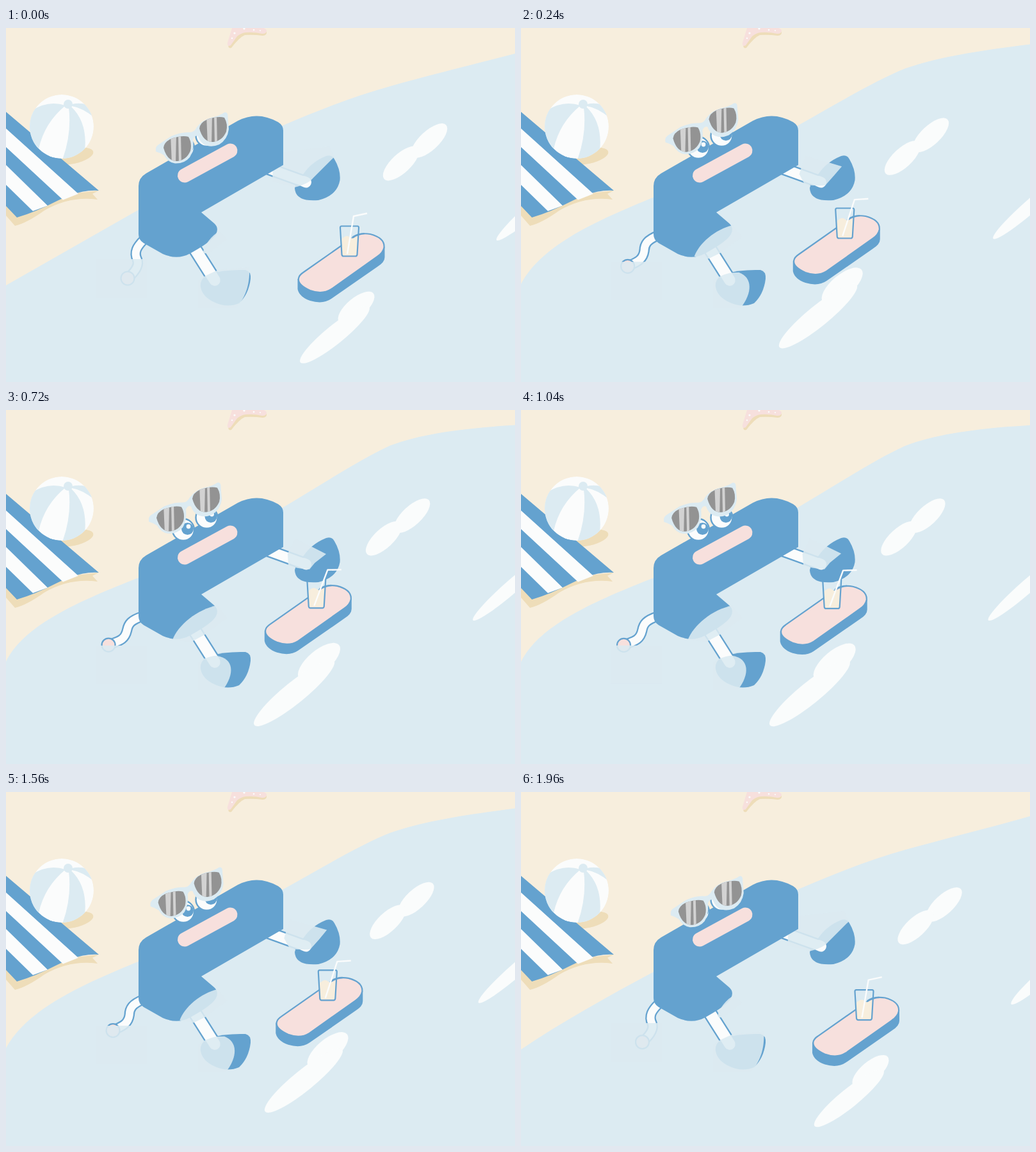
Animation, 795 px wide and 553 px high, one loop 2000 ms. Source, as an HTML page:

```html
<!DOCTYPE html>
<html lang="en">
<head>
<meta charset="utf-8">
<title>Beach day</title>
<style>
  html, body { margin: 0; width: 100%; height: 100%; overflow: hidden; background: #f7eedd; }
  svg { display: block; width: 795px; height: 553px; --p: 0; --q: 0; }
  .blue { fill: #64a2cf; }
  .pale { fill: #dcebf2; }
  .white { fill: #fbfcfc; }
  .pink { fill: #f7e0dd; }
  .shade { fill: #eeddb9; }
  .line { fill: none; stroke: #64a2cf; stroke-width: 2.2; stroke-linejoin: round; }
  .veil { fill: #dcebf2; fill-opacity: .88; }
  .limb { fill: none; stroke-linecap: round; stroke-linejoin: round; }
  .rim { stroke: #64a2cf; }
  .skin { stroke: #fbfcfc; }
  .float { transform: translate(calc(var(--p) * -52px), calc(var(--p) * -47.4px)); }
  .straw { transform-origin: 533px 353px; transform: rotate(calc(var(--q) * 11deg)); }
  .foam1 { transform: translate(calc(var(--q) * -27px), calc(var(--q) * -11px)); }
  .foam2 {
    transform-origin: 517px 468px;
    transform: translate(calc(var(--q) * -63px), calc(var(--q) * -39px)) scale(calc(1 + var(--q) * .16));
  }
  .foam3 { transform: translate(calc(var(--q) * -37px), calc(var(--q) * -3px)); }
  .shades { transform: translate(calc(var(--q) * -11px), calc(var(--q) * -18.5px)); }
  #hand { transform: translate(calc(var(--q) * -30px), calc(var(--q) * -24px)); }
</style>
</head>
<body>
<svg id="scene" viewBox="0 0 795 553">
  <defs>
    <clipPath id="lensClip">
      <path id="lensShape" d="M246 187Q247 178 258 173Q275 167 285 170Q291 180 288 192Q282 206 268 208Q252 209 246 187Z"/>
    </clipPath>
    <clipPath id="ballClip"><circle cx="87" cy="154" r="50"/></clipPath>
    <g id="lens">
      <use href="#lensShape" fill="#939393"/>
      <path clip-path="url(#lensClip)" fill="#d2d2d2" d="M257 165H266L265 212H259ZM269 165H273L274 212H270Z"/>
    </g>
    <g id="eye">
      <circle r="17" class="white" stroke="#64a2cf" stroke-width="2.4"/>
      <circle cx="6.500" cy="-1.500" r="9.500" class="blue"/>
      <circle cx="8" cy="-5" r="3.400" class="white"/>
    </g>
  </defs>

  <rect width="795" height="553" fill="#f7eedd"/>

  <!-- beach -->
  <path class="shade" d="M356 0L347 26Q347 33 352 31Q364 15 373 11Q386 10 401 12Q408 12 407 5L401 0Z"/>
  <path class="pink" d="M353 0L346 23Q345 30 351 27L361 13Q367 8 374 7Q388 6 400 9Q408 9 407 3L400 -2Z"/>
  <g class="white">
    <circle cx="357" cy="8" r="1.6"/><circle cx="353" cy="16" r="1.2"/><circle cx="372" cy="1" r="1.6"/>
    <circle cx="387" cy="3" r="1.3"/><circle cx="397" cy="4" r="1.1"/>
  </g>
  <ellipse class="shade" cx="105" cy="200" rx="32" ry="12" transform="rotate(-12 105 200)"/>
  <path class="shade" d="M0 270L145 254L135 259L143 268Q100 262 60 285Q32 305 14 309L0 293Z"/>
  <path class="blue" d="M0 131L145 254Q115 252 80 270Q45 288 17 296L0 278Z"/>
  <path class="white" d="M0 157L113 259L89 268.500L0 186ZM0 214L65 277.500L42 286L0 245Z"/>
  <g clip-path="url(#ballClip)">
    <circle class="white" cx="87" cy="154" r="50"/>
    <g class="pale">
      <path d="M93 121Q66 112 40 129L30 170L51 189Q60 148 93 121Z"/>
      <path d="M98 124Q103 165 88 206L122 200Q130 150 102 123Z"/>
      <path d="M103 119Q116 116 126 120L138 140Q120 125 103 122Z"/>
      <circle cx="97" cy="119" r="7"/>
    </g>
  </g>

  <!-- sea -->
  <path id="sea" class="pale"/>
  <g fill="#fafcfc">
    <g class="foam1">
      <ellipse rx="36" ry="15" transform="translate(661 176) rotate(-43)"/>
      <ellipse rx="36" ry="15" transform="translate(617 211.500) rotate(-43)"/>
    </g>
    <g class="foam2">
      <ellipse rx="35" ry="15" transform="translate(547 437) rotate(-40)"/>
      <ellipse rx="69" ry="14.500" transform="translate(513.500 479) rotate(-39)"/>
    </g>
    <g class="foam3"><ellipse rx="83" ry="10.500" transform="translate(829 277) rotate(-41)"/></g>
  </g>

  <!-- board and drink -->
  <g class="float">
    <path class="blue" d="M455.500 392V408Q458 420 475 426Q495 432 508 423L580 373Q591.500 366 591.500 358V342Z"/>
    <path class="line" style="fill:#f7e0dd" d="M464 382L541 328Q553 319 569 322Q592 328 590.500 343Q589 351 580 357L508 408Q494 417 475 410Q455 401 457 391Q458 386 464 382Z"/>
    <path class="pale" d="M522.500 310H551L541 326L524 338Z"/>
    <path d="M524 330Q532 322 537 327Q542 331 549 325L547.500 355H525Z" fill="#f7eedd"/>
    <path class="line" d="M541 327Q549 321 560 321"/>
    <path class="line" d="M524 309.500H549Q551 309.500 551 312L548.500 354Q548 356.500 546 356.500H527Q525 356.500 524.500 354L522 312Q522 309.500 524 309.500Z"/>
  </g>

  <!-- character -->
  <path class="limb rim arm" stroke-width="16.500"/>
  <path class="limb skin arm" stroke-width="12"/>
  <g id="hand"><circle class="pink" cx="190" cy="391" r="10.500" stroke="#64a2cf" stroke-width="2.200"/></g>
  <rect id="handVeil" class="veil" x="140" width="80" height="60"/>

  <path class="blue" d="M304 405Q302 391 318 384Q342 377 374 378Q383 380 382 392Q379 416 364 430Q350 436 335 432Q308 424 304 405Z"/>
  <path class="limb rim" stroke-width="22" d="M295 345L326 394"/>
  <path class="limb skin" stroke-width="17.500" d="M295 345L326 394"/>

  <path class="blue" d="M462 232Q475 210 500 200Q509 197 513 205Q523 222 521.500 238Q517 262 488 269Q452 272 451 250Q452 243 462 232Z"/>
  <path class="limb rim" stroke-width="20" d="M405 218L466 240"/>
  <path class="limb skin" stroke-width="15.500" d="M405 218L466 240"/>
  <path class="limb skin" stroke-width="17" d="M465 239.500L468.500 241"/>
  <path id="legVeil" class="veil"/>

  <path class="blue" d="M207 247Q207 234 219 227L362 145Q393 129 425 147Q433 152 433 160V214L305 288L325 305Q333 312 328 322Q322 332 300 345L288 352Q268 363 245 353L215 336Q207 331 207 322Z"/>

  <path id="bodyVeil" class="veil"/>
  <path id="footVeil" class="veil"/>

  <use href="#eye" x="277" y="187"/>
  <use href="#eye" x="313.500" y="168"/>
  <path class="limb" stroke="#f7e0dd" stroke-width="22" d="M279 230.500L350.500 191.500"/>

  <g class="shades">
    <path class="pale" d="M234 190Q233 185 240 181L258 169Q274 162 287 163Q294 163 298 155Q306 144 320 140Q334 137 341 132Q347 130 346.500 140L348 158Q346 174 333 182Q319 188 308 181Q302 176 300 169Q295 167 292 174Q294 190 287 202Q279 212 264 211.500Q253 210 247 199Q241 195 234 193Z"/>
    <use href="#lens"/>
    <use href="#lens" x="56" y="-30"/>
  </g>

  <g class="float">
    <path class="straw" d="M533 353L543 294L564 289.500" fill="none" stroke="#fbfcfc" stroke-width="2.400" stroke-linejoin="round"/>
  </g>
</svg>

<script>
const scene = document.getElementById('scene');
const arms = document.querySelectorAll('.arm');
const el = id => document.getElementById(id);
const lerp = (a, b, k) => a + (b - a) * k;

// Blends two path strings that share the same commands.
function morph(from, to, k) {
  const ends = to.match(/-?[\d.]+/g);
  let i = 0;
  return from.replace(/-?[\d.]+/g, n => lerp(+n, +ends[i++], k).toFixed(2));
}

function bezier(x1, y1, x2, y2) {
  const at = (a, b, s) => 3 * a * s * (1 - s) ** 2 + 3 * b * s * s * (1 - s) + s ** 3;
  return u => {
    let lo = 0, hi = 1;
    for (let i = 0; i < 24; i++) {
      const mid = (lo + hi) / 2;
      if (at(x1, x2, mid) < u) lo = mid; else hi = mid;
    }
    return at(y1, y2, lo);
  };
}

const LOOP = 2000, PEAK = 800, STEP = 40;
const cycle = (rise, fall) => t =>
  t < PEAK ? rise(t / PEAK) : 1 - fall((t - PEAK) / (LOOP - PEAK));
const drift = cycle(bezier(.167, 0, .167, 1), bezier(.8, 0, .8, 1));
const tide = cycle(bezier(.05, .2, 0, 1), bezier(.97, 0, .84, 1));

function draw(t) {
  const p = drift(t), q = tide(t), r = Math.sqrt(Math.max(0, q));
  scene.style.setProperty('--p', p.toFixed(4));
  scene.style.setProperty('--q', q.toFixed(4));

  const left = morph('C69 363 138 323 207 284', 'C28 335 118 297 207 262', r);
  const right = morph('C490 128 545 106 600 91', 'C500 112 557 75 600 55.5', q);
  const far = morph('C660 74 730 57', 'C650 36 720 28', q);
  const shore = 402 + 20 * q - 29 * q * q;
  el('sea').setAttribute('d',
    `M0 ${shore}${left}L433 152${right}${far} 795 ${lerp(40, 23.5, r)}V553H0Z`);

  const arm = morph('M215 331C205 341 199 350 205 362C209 372 198 384 190 391',
                    'M214 322C195 328 191 334 189 344C185 361 174 361 160 367', q);
  arms.forEach(a => a.setAttribute('d', arm));
  el('handVeil').setAttribute('y', 361 + 7 * q * q);

  el('bodyVeil').setAttribute('d', morph(
    'M308 349C311 338 320 325 334 317L346 330L318 352L309 352Z',
    'M260 359C268 337 298 311 331 305L346 325L312 350L288 363Z', q));
  el('footVeil').setAttribute('d', morph(
    'M300 394Q312 386 334 377L380 374C381 395 377 418 359 438L300 438Z',
    'M300 394Q312 386 325 384L329 384C356 388 358 412 338 438L300 438Z', q));
  el('legVeil').setAttribute('d', morph(
    'M418 195L416 240L450 249Q472 244 480 234L513 201L505 185Z',
    'M451 200Q440 225 441 243L455 248Q474 249 482 239Q500 225 521 211L515 185Z', q));
}

const start = performance.now();
function tick() {
  const t = (performance.now() - start) % LOOP;
  draw(Math.floor(t / STEP) * STEP);
  requestAnimationFrame(tick);
}
tick();
</script>
</body>
</html>
```
